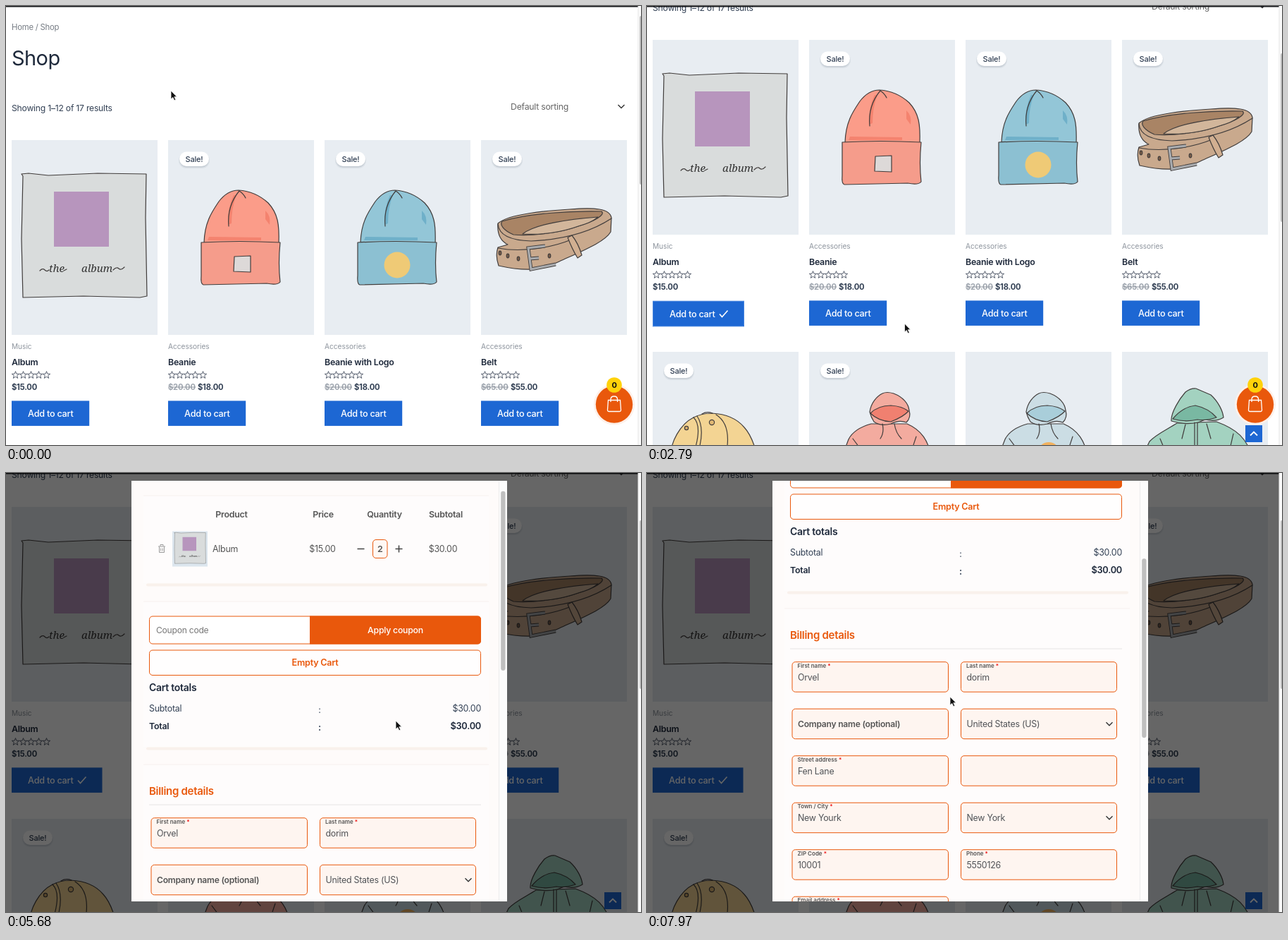
An HTML page that plays this animation: 901 px wide and 622 px high, repeating every 8 s.

```html
<!DOCTYPE html>
<html lang="en">
<head>
<meta charset="utf-8">
<title>Shop cart</title>
<style>
html, body { margin: 0; width: 100%; height: 100%; overflow: hidden; background: #fff; }
svg { display: block; width: 100%; height: 100%; }
text { font-family: Inter, Roboto, sans-serif; letter-spacing: -.02em; white-space: pre; }
.ink { stroke: #413d3c; stroke-width: 1.2; stroke-linejoin: round; stroke-linecap: round; }
.script { font: italic 15px 'Noto Serif', serif; letter-spacing: 0; }
</style>
</head>
<body>
<svg id="stage" viewBox="0 0 901 622" preserveAspectRatio="none"></svg>
<script>
const LOOP = 8000, BLUE = '#1d67d3', ORANGE = '#e9580c', SLATE = '#334155', DARK = '#1e293b';
const stage = document.getElementById('stage');

// Drawing helpers
const text = (x, y, str, { size = 12.4, fill = SLATE, weight = 400, anchor = 'start', extra = '' } = {}) =>
  `<text x="${x}" y="${y}" font-size="${size}" fill="${fill}" font-weight="${weight}" text-anchor="${anchor}" ${extra}>${str}</text>`;
const rect = (x, y, w, h, fill, extra = '') =>
  `<rect x="${x}" y="${y}" width="${w}" height="${h}" fill="${fill}" ${extra}/>`;
const circle = (x, y, r, fill, extra = '') => `<circle cx="${x}" cy="${y}" r="${r}" fill="${fill}" ${extra}/>`;
const line = (d, color, width = 1, extra = '') =>
  `<path d="${d}" fill="none" stroke="${color}" stroke-width="${width}" ${extra}/>`;
const ink = (d, fill = 'none') => `<path class="ink" d="${d}" fill="${fill}"/>`;
const group = (x, y, body, extra = '') => `<g transform="translate(${x} ${y})" ${extra}>${body}</g>`;
const chevron = (x, y) => line(`M${x - 4.5} ${y - 2}l4.5 4.5 4.5 -4.5`, '#333', 1.4);

// Motion helpers
const clamp = v => Math.max(0, Math.min(1, v));
const ease = v => v * v * (3 - 2 * v);
function track(keys, t) {
  const i = keys.findIndex(k => k[0] > t);
  if (i === 0) return keys[0].slice(1);
  if (i < 0) return keys[keys.length - 1].slice(1);
  const a = keys[i - 1], b = keys[i], p = ease((t - a[0]) / (b[0] - a[0]));
  return a.slice(1).map((v, j) => v + (b[j + 1] - v) * p);
}
const during = (t, from, to) => t >= from && t < to;

// Product illustrations
const albumArt =
  ink('M22 238 32 237 60 240 130 237 199 238 198 300 200 411 190 413 110 411 24 413 22 330 24 241Z', '#d9dcdc') +
  rect(68, 263, 78, 78, '#b795bd') +
  `<text class="script" x="61" y="377" fill="#333">the</text><text class="script" x="107" y="377" fill="#333">album</text>` +
  ink('M48 375q4-4 7-1t6 0M82 375l4-2M152 374q5-5 8-2t8-2');

function beanie(x, dome, brim, shade, patch) {
  return group(x, 0,
    ink('M51 335C52 306 62 292 72 277C82 264 92 261 100 261C116 262 130 268 142 279C156 294 158 310 157 337Z', dome) +
    `<path d="M93 268q-9 18-8 42l5-2q0-23 7-40zM138 290q8 7 6 20l-6-8zM58 327l74 1v4l-76 0z" fill="${shade}"/>` +
    ink('M101 262C91 274 84 290 86 312M101 262q6 4 9 10') +
    ink('M47 335Q100 332 159 335Q156 365 159 391Q155 396 140 393L50 395Q46 394 47 382Z', brim) + patch);
}

const buckle = 'M765 340L741 343L745 373L780 366M743 358l13-1';
const belt =
  ink('M698 308C714 294 770 290 800 288C835 285 857 287 859 300L858 320C850 334 820 346 785 362C762 374 740 377 699 368Q694 354 698 342L712 338C700 332 697 320 698 308Z', '#c9a98d') +
  ink('M704 305C740 294 800 290 845 291C851 296 835 305 812 312C785 322 745 326 720 324C706 318 700 310 704 305Z', '#a98465') +
  ink('M733 323C750 309 800 302 840 299C832 306 822 309 812 312C790 320 760 325 733 323Z', '#d2b69b') +
  ink('M698 309C699 322 712 332 745 333C790 331 830 320 859 301M698 343C735 350 778 341 802 331') +
  [[701, 350], [712, 354], [727, 358], [771, 354]].map(([x, y]) => `<ellipse class="ink" cx="${x}" cy="${y}" rx="1.8" ry="2.8" fill="#7a5d48"/>`).join('') +
  line(buckle, '#413d3c', 5) + line(buckle, '#a9abae', 3.2) +
  ink('M797 328l6-3q9 11 14 28l-6 4q-8-13-14-29Z', '#d1af91');

const cap =
  ink('M34 640C32 618 48 592 66 583Q78 577 92 577C112 578 128 585 138 597Q150 610 157 640Z', '#f3d493') +
  ink('M78 578q7-4 15-1M66 583Q80 596 64 640M98 579Q122 594 111 640M71 581Q84 600 70 640') +
  circle(56, 598, 2.6, '#d9ae6a', 'class="ink"') + circle(92, 590, 3.6, '#e0b873', 'class="ink"');

function hoodie(x, body, inner, extra = '') {
  return group(x, 0,
    ink('M88 592C70 597 61 604 56 614L46 640H174C169 616 160 601 139 592Z', body) +
    ink('M86 575C88 562 96 553 104 549Q110 546 120 549C133 554 141 563 142 573Q145 583 138 590Q128 586 116 592Q102 596 92 589Q88 583 86 575Z', body) +
    ink('M87 577Q98 566 116 566Q132 567 141 574Q134 582 116 589Q98 588 87 577Z', inner) +
    ink('M104 592q3 12-3 21M121 592q2 13 10 21M62 613l12 16M152 610l-6 18') + extra);
}

const greenHoodie =
  ink('M752 591C738 600 722 607 713 617L702 640H860C850 612 838 600 808 589Z', '#a3d2c0') +
  ink('M744 588C743 576 756 556 764 547Q772 541 779 542L800 551C811 561 817 574 818 583Q806 590 792 586L782 590Q764 594 744 588Z', '#a3d2c0') +
  ink('M746 585Q760 568 778 566Q797 570 808 583Q793 588 781 586Q764 590 746 585Z', '#79b8a2') +
  ink('M777 590V640M781 590V640M764 593l-5 20M794 592l6 21M728 613l10 24M832 606l-6 26');

// Shop page
const star = Array.from({ length: 10 }, (_, i) => {
  const r = i % 2 ? 2.3 : 5.4, a = i * Math.PI / 5;
  return `${(r * Math.sin(a)).toFixed(2)},${(-r * Math.cos(a)).toFixed(2)}`;
}).join(' ');
const stars = [0, 1, 2, 3, 4].map(i =>
  `<polygon points="${star}" transform="translate(${5.5 + 11 * i} 523)" fill="none" stroke="#475060" stroke-width=".9"/>`).join('');
const saleBadge = y =>
  rect(15, y + 1, 44, 22.5, '#8794a0', 'rx="11" opacity=".15"') + rect(16, y + 1, 42, 21, '#8794a0', 'rx="10.5" opacity=".25"') +
  rect(16, y, 42, 20.5, '#fff', 'rx="10.25"') +
  text(37, y + 14, 'Sale!', { size: 11, weight: 500, anchor: 'middle' });
const photo = (x, y) => rect(x, y, 207, 276, '#e8edf2');
const columns = [8, 230, 452, 674];

const products = [
  ['Music', 'Album', '', '$15.00'],
  ['Accessories', 'Beanie', '$20.00', '$18.00'],
  ['Accessories', 'Beanie with Logo', '$20.00', '$18.00'],
  ['Accessories', 'Belt', '$65.00', '$55.00']
].map(([category, name, was, price], i) => group(columns[i], 0,
  photo(0, 190) + (was && saleBadge(206.5)) +
  text(0, 485.5, category, { size: 10.1, fill: '#8d949d', extra: 'style="letter-spacing:0"' }) +
  text(0, 508.5, name, { weight: 600, fill: DARK }) + stars +
  (was && text(0, 544, was, { size: 11.2, weight: 700, fill: '#a0a7b0' }) + rect(0, 539.5, 39, 1, '#8d949d')) +
  text(was ? 42 : 0, 544, price, { size: 11.2, weight: 700 }) +
  (i ? rect(0, 559.4, 110.2, 35.5, BLUE) + text(23, 581.5, 'Add to cart', { size: 12.7, fill: '#fff', weight: 500 }) : '')
)).join('');

const topPart =
  text(8, 34, 'Home / Shop', { size: 11.3, fill: '#777d85' }) +
  text(8, 84, 'Shop', { size: 29, fill: DARK }) +
  text(8, 148.5, 'Showing 1–12 of 17 results', { size: 12.2 }) +
  text(716, 147, 'Default sorting', { size: 12.3, fill: '#666' }) + chevron(873, 142) + products + albumArt +
  beanie(230, '#fb9c89', '#f59c8b', '#f4836f', ink('M94 355l23 -1v23l-24 -1Z', '#ddd9d8')) +
  beanie(452, '#93c6d7', '#8cc0d2', '#6fb0c9', circle(103, 367, 18.5, '#efca76')) + belt;

const secondRow = columns.map((x, i) => group(x, 0, photo(0, 490) + (i < 2 ? saleBadge(506.5) : ''))).join('') +
  cap + hoodie(230, '#f3ab9f', '#f08070') +
  hoodie(452, '#cbdde4', '#a9ceda', circle(118, 634, 16, '#f2b15d')) + greenHoodie;

function firstButton(t) {
  const hover = during(t, 1400, 2300), focus = during(t, 1700, 3500) ? 1 : 0;
  const loading = during(t, 1800, 2200), added = t >= 2200;
  const w = (t >= 1800 ? 128.5 : 110.2) + focus * 1.5, y = 559.4 + focus * .4, h = 35.5 + focus * .9;
  return `<g opacity="${loading ? .25 : 1}">` +
    rect(8, y, w, h, hover ? '#165ab1' : BLUE) +
    (focus && !hover ? rect(8.5, y + .5, w - 1, h - 1, 'none', 'stroke="#78a8ec" stroke-dasharray="1 1"') : '') +
    text(31 + focus, 581.5 + focus, 'Add to cart', { size: 12.7, fill: '#fff', weight: 500 }) +
    (added ? line(`M${102 + focus} ${577.5 + focus}l3.5 4 8-9`, '#fff', 1.6) : '') + '</g>';
}

const basket = circle(863, 564.5, 29, '#fdf0e9') + circle(863, 564.5, 26.2, ORANGE) +
  line('M854.5 558.5h17l1 13.5q.2 2.5-2.3 2.5h-14.4q-2.5 0-2.3-2.5ZM858 561v-3.5q0-4.5 4.8-4.5t4.8 4.5v3.5', '#fff', 1.3) +
  circle(863, 537, 10.8, '#ffd20a') + text(863, 541, '0', { size: 11, weight: 700, fill: '#111', anchor: 'middle' });
const toTop = rect(849, 594, 24, 24, BLUE) + line('M856 608.5l5-5 5 5', '#fff', 1.8);

function page(t, scroll) {
  const shift = during(t, 1700, 2200) ? 1 : 0;
  return rect(0, 0, 901, 622, '#fff') + group(0, -scroll, topPart + firstButton(t)) +
    group(0, 142 - scroll + shift, secondRow) + (scroll > 100 ? toTop : '') + (t < 3600 ? basket : '') +
    rect(0, 0, 897, 1.5, '#15171a');
}

// Cart dialog
const outline = `stroke="${ORANGE}" rx="4.5"`;
const caption = { weight: 600, fill: '#555', anchor: 'middle' };
const label = (x, y, str) =>
  text(x, y, `${str} <tspan fill="#e11">*</tspan>`, { size: 8, weight: 600, fill: '#555', extra: 'style="letter-spacing:0"' });

const fieldRows = [
  [['First name', 'Orvel'], ['Last name', 'dorim']],
  [['', 'Company name (optional)', 'bold'], ['', 'United States (US)', 'select']],
  [['Street address', 'Fen Lane'], ['', '']],
  [['Town / City', 'New Yourk'], ['', 'New York', 'select']],
  [['ZIP Code', '10001'], ['Phone', '5550126']],
  [['Email address', '']]
];
const fields = fieldRows.map((row, r) => row.map(([name, value, kind], c) => {
  const x = c ? 445.5 : 206, y = 518.2 + 66.5 * r;
  return rect(x, y, c ? 221 : 221.5, 42.5, '#fef5f0', outline) + (name && label(x + 7.5, y + 8, name)) +
    text(x + 8, y + 26, value, kind === 'bold' ? { size: 12.1, weight: 600, fill: '#555' } : { fill: '#505357' }) +
    (kind === 'select' ? chevron(656, y + 21) : '');
}).join('')).join('');

const card = (y, h) => rect(195, y, 490, h, '#fefcfc') + rect(195, y, 490, 1, '#f7f1ef') + rect(199, y + h, 484, 4, '#f9f1ec', 'rx="2"');

function cart(t) {
  const updated = t >= 5400, price = updated ? '$30.00' : '$15.00', colon = updated ? 445 : 451;
  const right = { anchor: 'end' };
  return card(61, 125) + card(211, 207) + card(442, 900) +
    line('M194 19h4l3 11h9l2-8h-12.5M201 30l-2 2h12', '#444b55', 1.5) +
    circle(201, 34, 1.3, '#444b55') + circle(209, 34, 1.3, '#444b55') +
    text(438.5, 36, 'Your cart', { size: 17, weight: 600, fill: '#444', anchor: 'middle' }) +
    line('M669 21.5l11 11m0-11l-11 11', '#333', 2) +
    (during(t, 4200, 5200) ? rect(210, 104, 463, 65, '#fdece5', 'rx="8"') : '') +
    [['Product', 320], ['Price', 450], ['Quantity', 537], ['Subtotal', 624]].map(([s, x]) => text(x, 92, s, caption)).join('') +
    line('M216 133.5h10M219 133v-2h4v2M217.5 134v8h7v-8M219.7 136v4M222.3 136v4', '#999', 1) +
    rect(236, 112, 50, 50, '#dce6ee') + `<g transform="translate(233.5 54.5) scale(.25)">${albumArt}</g>` +
    text(293, 141.5, 'Album', { fill: '#555' }) +
    text(449, 141.5, '$15.00', { fill: '#555', anchor: 'middle' }) +
    text(620, 141.5, price, { fill: '#555', anchor: 'middle' }) +
    line('M498.5 137h10M552.5 137h10M557.5 132v10', '#444', 1.5) +
    rect(520.5, 124, 20.5, 26, '#fff8f4', outline) +
    text(530.7, 141.5, t >= 4700 ? '2' : '1', { weight: 600, fill: '#555', anchor: 'middle' }) +
    rect(203.5, 232.5, 470, 39, '#fff', outline) +
    `<path d="M431 232h238q5 0 5 5v30q0 5-5 5h-238Z" fill="${ORANGE}"/>` +
    text(213, 256, 'Coupon code', { size: 12.1, fill: '#777' }) +
    text(552.5, 256.5, 'Apply coupon', { size: 12.3, weight: 500, fill: '#fff', anchor: 'middle' }) +
    rect(203.5, 280.5, 470, 35.5, '#fffefe', outline) +
    text(438.5, 302, 'Empty Cart', { size: 12.6, weight: 600, fill: ORANGE, anchor: 'middle' }) +
    text(203, 338.5, 'Cart totals', { size: 14, weight: 600, fill: DARK }) +
    text(203, 367, 'Subtotal') + text(colon, 369.5, ':', { anchor: 'middle' }) + text(674, 367, price, right) +
    text(203, 392, 'Total', { weight: 600, fill: DARK }) +
    text(colon, 394.5, ':', { weight: 700, anchor: 'middle' }) +
    text(674, 392, price, { size: 12.8, weight: 600, fill: DARK, anchor: 'end' }) +
    text(203, 485, 'Billing details', { size: 15, weight: 600, fill: ORANGE }) +
    rect(203, 499, 471, 1, '#e7e5e5') + fields;
}

function dialog(t) {
  const [scroll] = track([[5500, 0], [6400, 233.5], [7300, 250.5]], t);
  const busy = during(t, 4700, 5400), spin = (t - 4700) * .36 - 60;
  const arc = 'M-10.6 -10.6A15 15 0 0 1 10.6 -10.6M10.6 10.6A15 15 0 0 1 -10.6 10.6';
  return `<g opacity="${clamp((t - 3400) / 300)}">` + rect(0, 0, 897, 622, '#000', 'opacity=".6"') +
    '<clipPath id="frame"><rect x="178" y="11" width="533" height="596"/></clipPath><g clip-path="url(#frame)">' +
    rect(178, 11, 533, 596, '#fefbfa') + group(0, -scroll, cart(t)) +
    rect(699, 11, 12, 596, '#fcfcfc') + rect(699, 11, 1, 596, '#ececec') +
    rect(702.2, 13 + scroll * .432, 6.3, 254, '#bfbfbf', 'rx="3.1"') +
    (busy ? rect(178, 11, 533, 596, '#000', 'opacity=".08"') +
      group(445, 309.5, line(arc, '#444', 2, `transform="rotate(${spin + 90})"`)) : '') + '</g></g>';
}

// Pointer
const pointerPath = [
  [0, 234, 120], [900, 260, 425], [1000, 260, 425], [1500, 84, 437], [1700, 84, 437], [2500, 184, 450],
  [2800, 365.5, 450], [3400, 860, 562], [3500, 860, 562], [3800, 692, 447], [4300, 592, 140], [4500, 552, 136],
  [5000, 552, 136], [5500, 553, 351], [6400, 553, 351], [7300, 372, 354], [7500, 372, 354], [8000, 430, 317]
];
const pointerShapes = {
  arrow: '<path d="M0 0V12L2.8 9.5 4.8 13.8 6.8 12.9 4.9 8.7H8.5Z" fill="#111" stroke="#fff" stroke-width=".8"/>',
  hand: '<path d="M-3 .8a1.3 1.3 0 0 1 2.6 0V5l5 1q1.5.5 1.2 2L4.4 12.5H-1L-5 7.6q0-1.6 2 0Z" fill="#fff" stroke="#111" stroke-width="1.1"/>',
  beam: line('M-2 0h4M0 0v13M-2 13h4', '#222', 1)
};
function pointer(t) {
  const hand = during(t, 1400, 2300) || during(t, 3300, 3600) || during(t, 6300, 6600);
  const [x, y] = track(pointerPath, t);
  return group(x, y, pointerShapes[hand ? 'hand' : during(t, 7300, 7700) ? 'beam' : 'arrow']);
}

function scene(t) {
  const scroll = 142 * ease(clamp(t / 900));
  return page(t, scroll) + (t >= 3500 ? dialog(t) : '') +
    rect(897, 0, 4, 622, '#fbfbfb') + rect(896.5, 0, 1, 622, '#e6e6e6') +
    rect(899, 14 + scroll * .373, 4, 239, '#bdbdbd', 'rx="2"') + pointer(t);
}

// The picture advances in tenths of a second.
const start = performance.now();
let shown = -1;
function tick() {
  const t = Math.floor(((performance.now() - start) % LOOP + 30) / 100) * 100;
  if (t !== shown) stage.innerHTML = scene(shown = t);
  requestAnimationFrame(tick);
}
tick();
</script>
</body>
</html>
```
